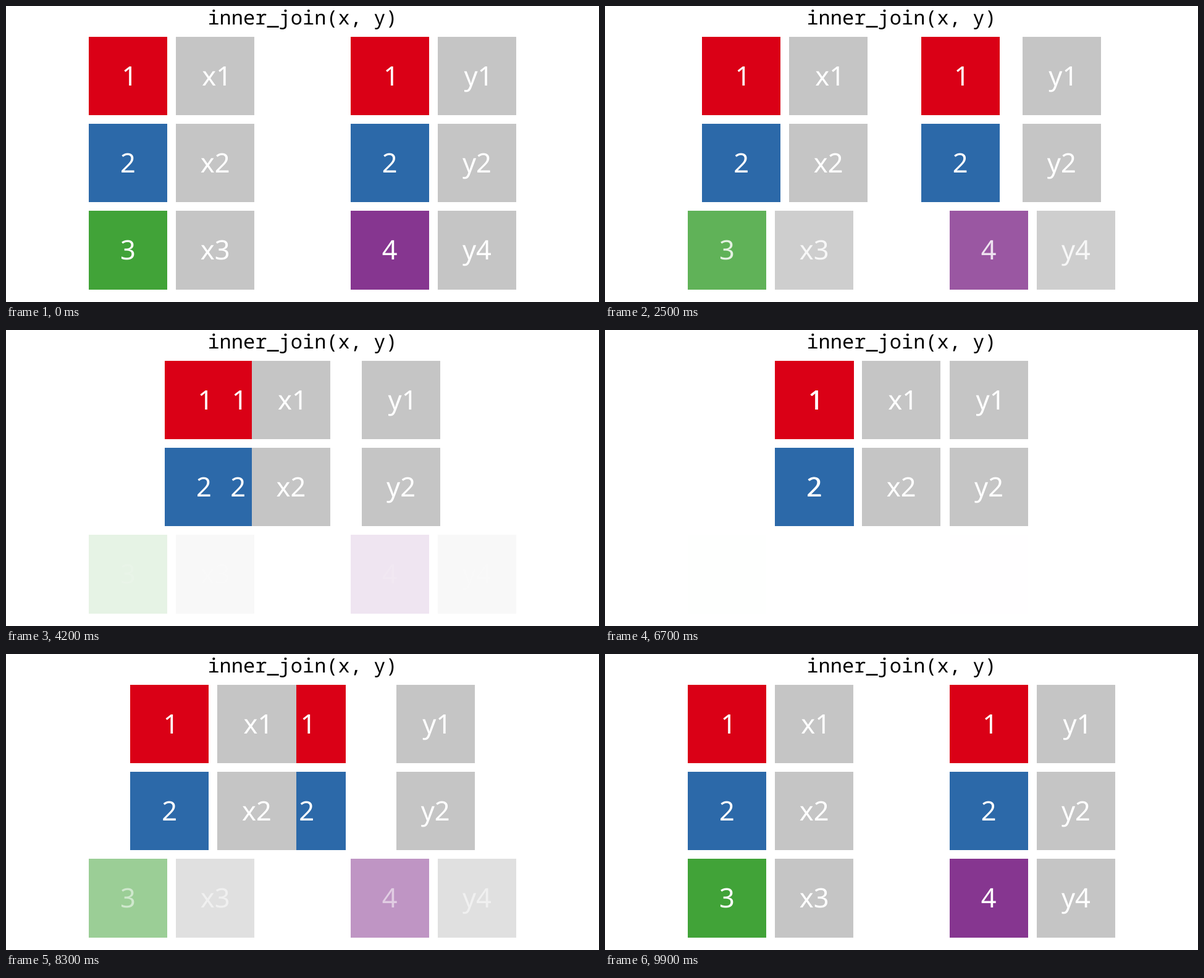
These frames come from a looping animation (960 by 480 pixels, 10 s). An HTML page:

```html
<!DOCTYPE html>
<html lang="en">
<head>
<meta charset="utf-8">
<title>Inner join</title>
<style>
  html, body { margin: 0; width: 100%; height: 100%; overflow: hidden; background: #fff; }
  svg { display: block; width: 960px; height: 480px; }
  text { text-anchor: middle; text-rendering: geometricPrecision; }
  .title { font: 32px "Fira Mono", "Noto Sans Mono", "DejaVu Sans Mono", monospace; white-space: pre; }
  .label { font: 43.4px "Noto Sans", "Open Sans", sans-serif; fill: #fff; }
</style>
</head>
<body>
<svg viewBox="0 0 960 480">
  <text class="title" x="480" y="30">inner_join(x, y)</text>
  <g id="tiles"></g>
  <g id="labels"></g>
</svg>
<script>
const LOOP = 10000, STEP = 100;
const LEFT = 133.95, TOP = 50, PITCH = 141.22, SIZE = 127.1;
const RED = "#da0016", BLUE = "#2c69a9", GREEN = "#41a338", PURPLE = "#863690", GREY = "#c5c5c5";

// Column positions are in tile pitches; cells without a match fade in place.
const cells = [];
function addColumn(from, to, names, colors) {
  names.forEach((name, row) => {
    const matched = row < 2;
    cells.push({ name, row, from, to: matched ? to : from, matched, color: colors[row] });
  });
}
const greys = [GREY, GREY, GREY];
addColumn(3, 1, ["1", "2", "4"], [RED, BLUE, PURPLE]);
addColumn(0, 1, ["1", "2", "3"], [RED, BLUE, GREEN]);
addColumn(1, 2, ["x1", "x2", "x3"], greys);
addColumn(4, 3, ["y1", "y2", "y4"], greys);

function add(parent, tag, attrs) {
  const node = document.createElementNS("http://www.w3.org/2000/svg", tag);
  for (const key in attrs) node.setAttribute(key, attrs[key]);
  return document.getElementById(parent).appendChild(node);
}

for (const cell of cells) {
  const y = TOP + cell.row * PITCH;
  const top = Math.round(y);
  cell.rect = add("tiles", "rect", { y: top, height: Math.round(y + SIZE) - top, fill: cell.color });
  cell.label = add("labels", "text", { class: "label", y: y + SIZE / 2 + 15.5 });
  cell.label.textContent = cell.name;
  // The numeral 1 is narrow, so nudge it to look centred.
  cell.nudge = cell.name.endsWith("1") ? 2.5 : 0;
}

function ease(t, start, end) {
  const u = Math.min(1, Math.max(0, (t - start) / (end - start)));
  return (1 - Math.cos(Math.PI * u)) / 2;
}

function draw(time) {
  const t = Math.floor((time % LOOP) / STEP) * STEP;
  const joined = ease(t, 1600, 5000) - ease(t, 6600, 9900);
  for (const { from, to, matched, rect, label, nudge } of cells) {
    const x = LEFT + (from + (to - from) * joined) * PITCH;
    const left = Math.round(x);
    const opacity = matched ? 1 : 1 - joined;
    rect.setAttribute("x", left);
    rect.setAttribute("width", Math.round(x + SIZE) - left);
    rect.setAttribute("fill-opacity", opacity);
    label.setAttribute("x", x + SIZE / 2 + nudge);
    label.setAttribute("fill-opacity", opacity);
  }
}

const begin = performance.now();
function tick() {
  draw(performance.now() - begin);
  requestAnimationFrame(tick);
}
tick();
</script>
</body>
</html>
```
